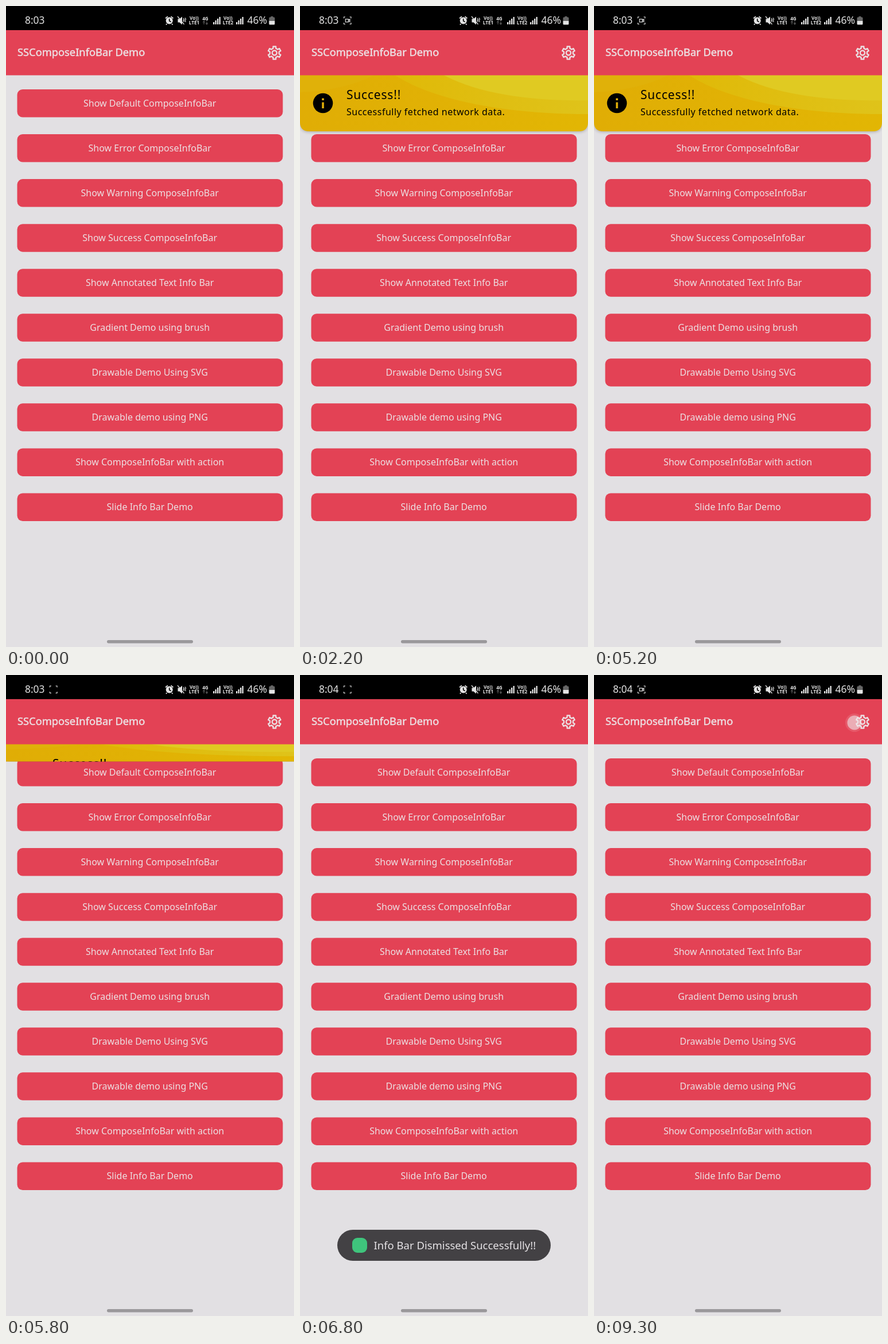
These frames come from a looping animation (502x1115 px, 9400 ms). An HTML page:

```html
<!DOCTYPE html>
<html lang="en">
<head>
<meta charset="utf-8">
<title>Info bar demo</title>
<style>
  html, body { margin: 0; width: 100%; height: 100%; overflow: hidden; background: #e2e0e3; }
  svg { display: block; width: 502px; height: 1115px; }
  text { font-family: "Noto Sans", "Open Sans", sans-serif; font-size: 16px; }
  .mid { text-anchor: middle; }
  .tiny { font-size: 8.2px; font-weight: 700; text-anchor: middle; }
  .line { fill: none; stroke: #dcdcdc; }
</style>
</head>
<body>
<svg viewBox="0 0 502 1115">
  <defs>
    <clipPath id="reveal"><rect id="revealBox" x="0" y="120" width="502" height="0"/></clipPath>
    <clipPath id="card"><path d="M0 120H502V202Q502 218 486 218H16Q0 218 0 202Z"/></clipPath>
    <linearGradient id="gold"><stop stop-color="#e0ad05"/><stop offset="1" stop-color="#e2b604"/></linearGradient>
    <linearGradient id="sheen"><stop stop-color="#e0b908"/><stop offset="1" stop-color="#dfc31a"/></linearGradient>
    <filter id="soft" x="-5%" y="-10%" width="110%" height="130%"><feGaussianBlur stdDeviation="2.5"/></filter>
  </defs>

  <rect width="502" height="1115" fill="#e2e0e3"/>
  <g id="buttons"></g>

  <g clip-path="url(#reveal)">
    <path d="M0 120H502V203Q502 219.5 486 219.5H16Q0 219.5 0 203Z" fill="#000" opacity=".22" filter="url(#soft)"/>
    <g clip-path="url(#card)">
      <g id="art">
        <rect width="502" height="98" fill="url(#gold)"/>
        <path d="M0 30C50 28 95 18 130 0H0Z" fill="#e0b109"/>
        <path d="M165 0C230 42 350 68 502 68V0Z" fill="url(#sheen)"/>
        <path d="M250 0C310 32 400 46 502 44V0Z" fill="#e0ca22"/>
      </g>
      <circle cx="40" cy="169" r="17.3"/>
      <path d="M38.2 160.5h3.6v3.6h-3.6zM38.2 167.5h3.6v10.5h-3.6z" fill="#e0ad08"/>
      <text x="81" y="162" style="font-size:21px;letter-spacing:.8px">Success!!</text>
      <text x="81" y="189.5" style="letter-spacing:.5px">Successfully fetched network data.</text>
    </g>
  </g>

  <rect y="42" width="502" height="78.5" fill="#e34255"/>
  <text x="20" y="87.3" fill="#ece0e3" stroke="#ece0e3" stroke-width=".5" style="font-size:18.3px">SSComposeInfoBar Demo</text>
  <g transform="translate(468 81.5)" fill="none" stroke="#ebdfe2" stroke-width="2.4" stroke-linejoin="round">
    <path id="gear"/><circle r="4"/>
  </g>

  <rect width="502" height="42"/>
  <g fill="#e4e4e4">
    <text id="clock" x="33" y="31" style="font-size:17.3px"></text>
    <text x="420.5" y="31" style="font-size:17.5px">46%</text>
    <g id="record" class="line" stroke-width="1.2">
      <path d="M76.5 21.5V19H79M86.5 19H89V21.5M89 29V31.5H86.5M79 31.5H76.5V29"/>
      <path id="camera" d="M79.3 22.8h5v5h-5zM84.3 24.6l2.6-1.5v4.4l-2.6-1.5"/>
    </g>
    <circle cx="284.7" cy="25.5" r="6"/>
    <path class="line" d="M278 21.5l4-3.4M291.4 21.5l-4-3.4M280.5 31l-1.6 1.7M289 31l1.6 1.7" stroke-width="1.8"/>
    <path d="M284.7 22v4l3 1.7" fill="none" stroke="#000" stroke-width="1.5"/>
    <path d="M299.5 22.5h3l4.5-4v14l-4.5-4h-3z"/>
    <path class="line" d="M299 18l11.5 14M309 21.5l1.5 2-1.5 2 1.5 2M312 20.5l1.4 2.5-1.4 2.5 1.4 2.5" stroke-width="1.3"/>
    <text class="tiny" x="328" y="23.5">Vo))</text><text class="tiny" x="328" y="32.3">LTE1</text>
    <text class="tiny" x="347.5" y="24.5">4G</text>
    <path class="line" d="M345 32v-5.5m-1.8 2l1.8-2 1.8 2M350 26.5V32m-1.8-2l1.8 2 1.8-2" stroke-width="1" opacity=".5"/>
    <text class="tiny" x="387" y="23.5">Vo))</text><text class="tiny" x="387" y="32.3">LTE2</text>
    <g id="signal"></g>
    <path d="M461.5 18h4v1.5h1.5q1.5 0 1.5 1.5V26h-10v-5q0-1.5 1.5-1.5h1.5z" fill="#666"/>
    <path d="M458.5 26h10v5q0 1.5-1.5 1.5h-7q-1.5 0-1.5-1.5z"/>
  </g>

  <g id="toast">
    <rect x="65" y="965" width="372" height="54" rx="27" fill="#434144"/>
    <rect x="91" y="979" width="26" height="26" rx="9" fill="#3fc47c"/>
    <text x="128.5" y="999" fill="#e6e3e6" style="font-size:18.5px">Info Bar Dismissed Successfully!!</text>
  </g>
  <rect x="176" y="1103" width="150" height="5.5" rx="2.7" fill="#9a989b"/>
  <g id="touch">
    <circle r="16" fill="#fff" opacity=".12"/>
    <circle r="12.5" fill="#efe6e8" opacity=".6"/>
  </g>
</svg>
<script>
const LOOP = 9400, STEP = 100;
const BAR_IN = 1681, BAR_OUT = BAR_IN + 4000, BAR_H = 98;
const TOAST = { show: 6150, hide: 8250, fade: 350 };
const TAPS = [
  { from: 1500, to: 1700, x: 300, y: 716 },
  { from: 9200, to: 9400, x: 454, y: 83 }
];
const LABELS = [
  'Show Default ComposeInfoBar', 'Show Error ComposeInfoBar',
  'Show Warning ComposeInfoBar', 'Show Success ComposeInfoBar',
  'Show Annotated Text Info Bar', 'Gradient Demo using brush',
  'Drawable Demo Using SVG', 'Drawable demo using PNG',
  'Show ComposeInfoBar with action', 'Slide Info Bar Demo'
];
const $ = id => document.getElementById(id);
const clamp = v => Math.max(0, Math.min(1, v));

$('buttons').innerHTML = LABELS.map((label, i) => {
  const y = 145 + i * 78.05;
  return `<rect x="19.5" y="${y}" width="463" height="48.5" rx="9.5" fill="#e34255"/>
    <text class="mid" x="250.7" y="${y + 30}" fill="#ece0e3">${label}</text>`;
}).join('');

$('signal').innerHTML = [361, 401].map(x => [4, 7, 10, 13].map((h, i) =>
  `<rect x="${x + i * 3.5}" y="${32 - h}" width="2.3" height="${h}"/>`).join('')).join('');

// Six teeth: each goes valley, tip, tip, valley.
const teeth = [];
for (let k = 0; k < 6; k++) {
  for (const [deg, r] of [[-17, 8.2], [-12, 11.3], [12, 11.3], [17, 8.2]]) {
    const a = (k * 60 + deg - 90) * Math.PI / 180;
    teeth.push((r * Math.cos(a)).toFixed(2) + ' ' + (r * Math.sin(a)).toFixed(2));
  }
}
$('gear').setAttribute('d', 'M' + teeth.join('L') + 'Z');

// Critically damped spring, 0 to 1.
function spring(ms) {
  const s = Math.max(0, ms) * 0.02;
  return 1 - (1 + s) * Math.exp(-s);
}

function draw(t) {
  let open = t < BAR_OUT ? spring(t - BAR_IN) : 1 - spring(t - BAR_OUT);
  if (open > 0.99) open = 1;
  if (open < 0.005) open = 0;
  $('revealBox').setAttribute('height', open * BAR_H + (open === 1 ? 12 : 0));
  $('art').setAttribute('transform', `translate(0 120) scale(1 ${Math.max(open, 0.01)})`);

  $('clock').textContent = t < 6600 ? '8:03' : '8:04';
  $('record').style.opacity = t < 100 ? 0 : 1;
  $('camera').style.opacity = Math.floor((t - 100) / 500) % 2 ? 0 : 1;

  $('toast').style.opacity = clamp((t - TOAST.show) / TOAST.fade) * (1 - clamp((t - TOAST.hide) / TOAST.fade));

  const tap = TAPS.find(p => t >= p.from && t < p.to);
  $('touch').style.opacity = tap ? 1 : 0;
  if (tap) $('touch').setAttribute('transform', `translate(${tap.x} ${tap.y})`);
}

const start = performance.now();
function tick() {
  const t = (performance.now() - start) % LOOP;
  draw(Math.floor(t / STEP) * STEP);
  requestAnimationFrame(tick);
}
tick();
</script>
</body>
</html>
```
